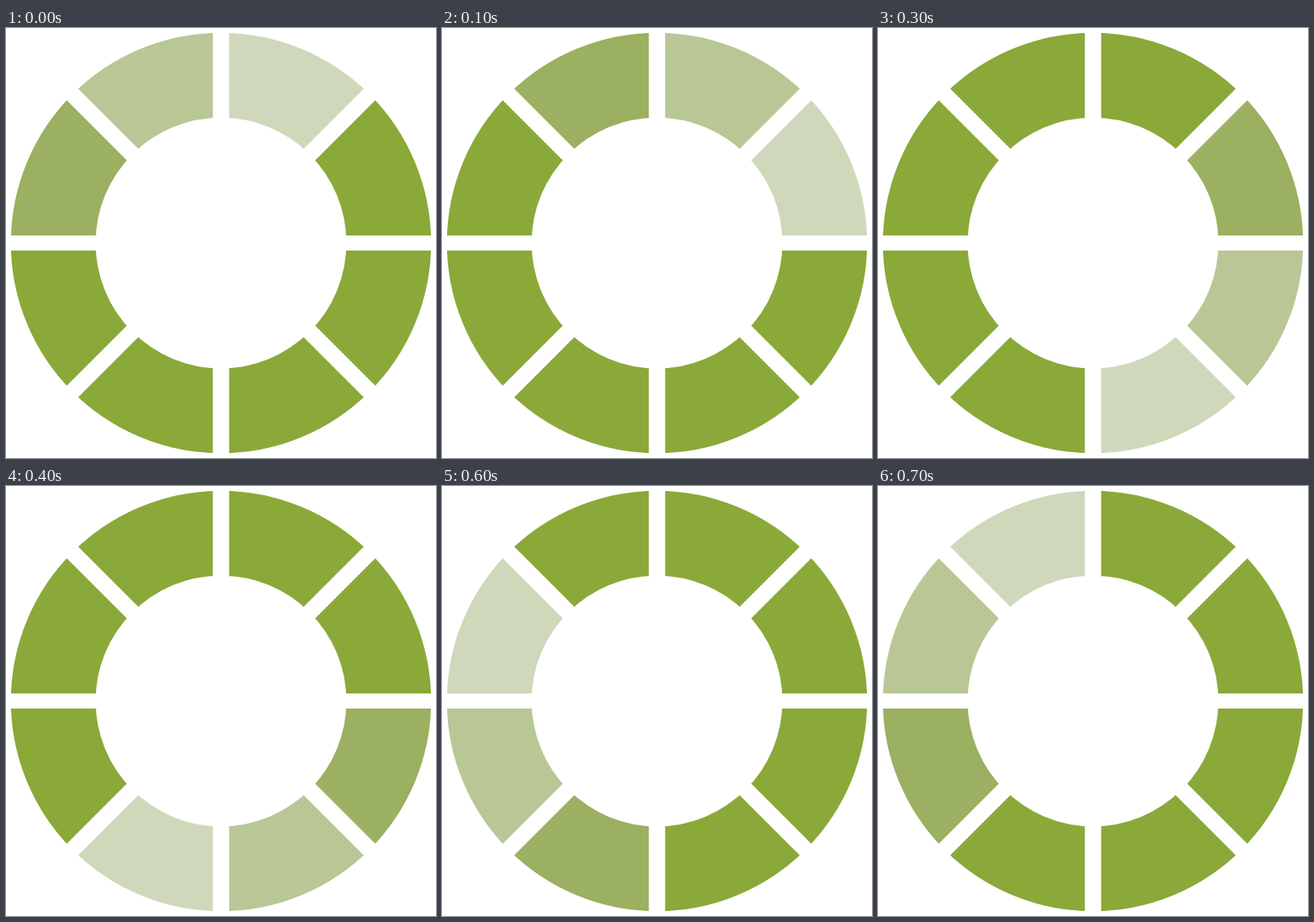
An HTML page with a canvas for the animation above (800 ms loop, 512 by 512 pixels).

```html
<!DOCTYPE html>
<html lang="en">
<head>
<meta charset="utf-8">
<title>Loading ring</title>
<style>
  html, body { margin: 0; width: 100%; height: 100%; overflow: hidden; background: #fff; }
  canvas { display: block; width: 100vmin; height: 100vmin; }
</style>
</head>
<body>
<canvas id="stage" width="512" height="512"></canvas>
<script>
const ctx = document.getElementById('stage').getContext('2d');
const SIZE = 512, C = SIZE / 2;
const OUTER = 250.2, INNER = 149.3;
const COUNT = 8, STEP_MS = 100;
const SLICE = Math.PI * 2 / COUNT;
const BASE = '#8aa939';
const TRAIL = ['#cfd8bb', '#b8c795', '#9bb060'];

function drawSegment(i, color) {
  const start = i * SLICE - Math.PI / 2;
  ctx.fillStyle = color;
  ctx.beginPath();
  ctx.arc(C, C, OUTER, start, start + SLICE);
  ctx.arc(C, C, INNER, start + SLICE, start, true);
  ctx.fill();
}

function drawGap(angle, width) {
  const dx = Math.cos(angle) * SIZE, dy = Math.sin(angle) * SIZE;
  ctx.lineWidth = width;
  ctx.beginPath();
  ctx.moveTo(C - dx, C - dy);
  ctx.lineTo(C + dx, C + dy);
  ctx.stroke();
}

function draw(step) {
  ctx.fillStyle = '#fff';
  ctx.fillRect(0, 0, SIZE, SIZE);
  for (let i = 0; i < COUNT; i++) {
    const age = (step - i + COUNT) % COUNT;
    drawSegment(i, TRAIL[age] || BASE);
  }
  ctx.strokeStyle = '#fff';
  drawGap(0, 18);
  drawGap(Math.PI / 2, 19.4);
  drawGap(Math.PI / 4, 19.4);
  drawGap(-Math.PI / 4, 19.4);
}

const origin = performance.now();
function tick() {
  const time = performance.now() - origin;
  draw(Math.floor(time / STEP_MS) % COUNT);
  requestAnimationFrame(tick);
}
tick();
</script>
</body>
</html>
```
